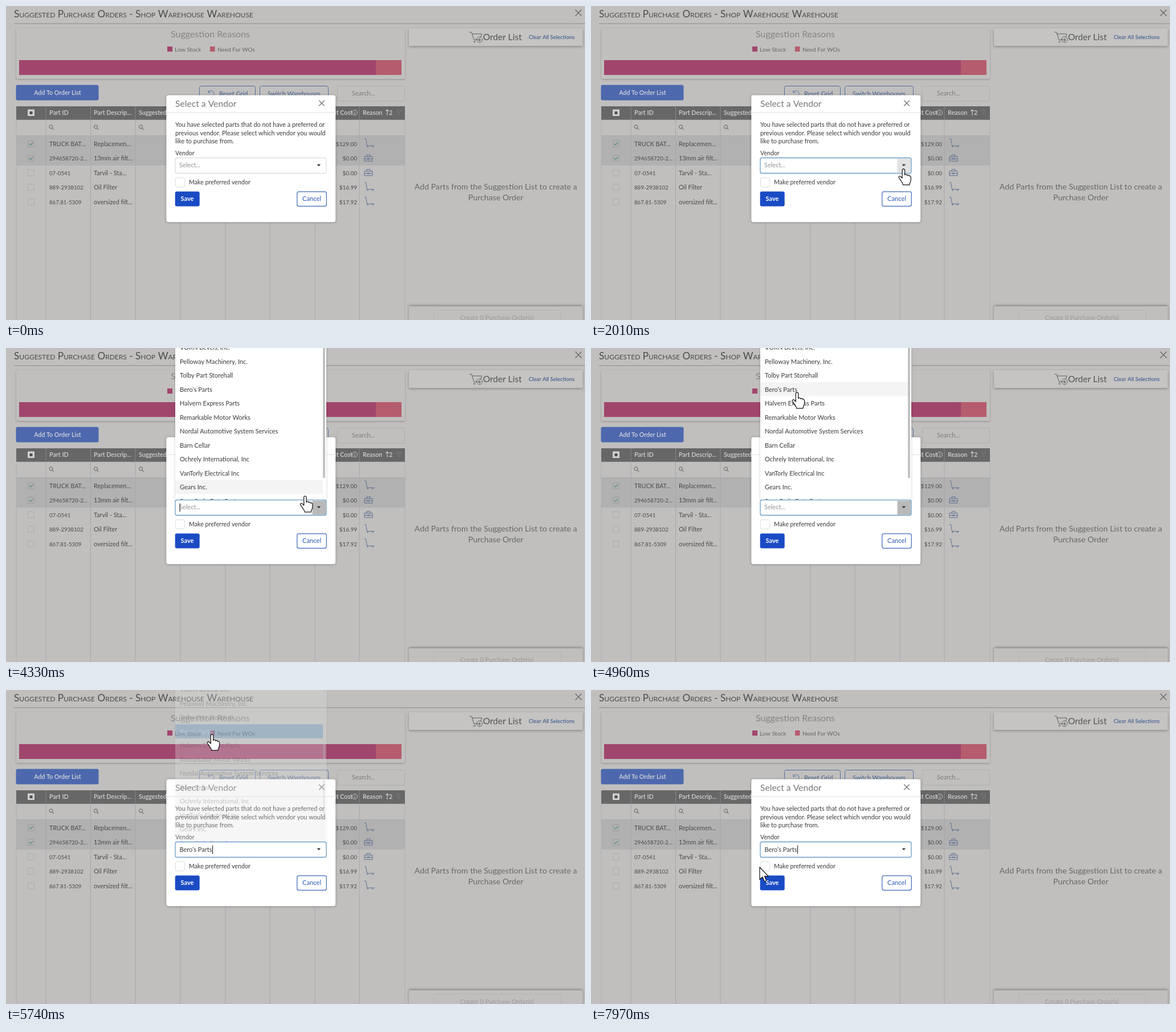
Recreate the animation shown at these times as an HTML page with a canvas. Size 1016 by 551 pixels, loop 8 s.

```html
<!DOCTYPE html>
<html lang="en">
<head>
<meta charset="utf-8">
<title>Select a Vendor</title>
<style>
html, body { margin: 0; width: 100%; height: 100%; overflow: hidden; background: #c0bfbe; }
canvas { display: block; width: 1016px; height: 551px; }
</style>
</head>
<body>
<canvas id="stage"></canvas>
<script>
const W = 1016, H = 551, LOOP = 8000;
const canvas = document.getElementById('stage');
const ctx = canvas.getContext('2d');
const dpr = window.devicePixelRatio || 1;
canvas.width = W * dpr;
canvas.height = H * dpr;

const BG = '#c0bfbe', INK = '#4a4a4a', LINE = '#a7a6a6', NAVY = '#46608e', ICON = '#54678b';
const COLS = [70, 148.5, 227, 306, 385, 463, 542, 620];
const PICK = 3;
const VENDORS = [
  'VORN Bevels, Inc.', 'Pelloway Machinery, Inc.', 'Tolby Part Storehall', 'Bero\u2019s Parts',
  'Halvern Express Parts', 'Remarkable Motor Works', 'Nordal Automotive System Services',
  'Barn Cellar', 'Ochrely International, Inc', 'VanTorly Electrical Inc', 'Gears Inc.',
  'Sure Code Data Port'
];
const ROWS = [
  ['TRUCK BAT...', 'Replacemen...', '$129.00', cart],
  ['294658720-2...', '13mm air filt...', '$0.00', toolbox],
  ['07-0541', 'Tarvil - Sta...', '$0.00', toolbox],
  ['889-2938102', 'Oil Filter', '$16.99', cart],
  ['867.81-5309', 'oversized filt...', '$17.92', cart]
];

const ARROW = new Path2D('M0 0V21.5L4.9 17 8.3 25 11.8 23.5 8.5 15.8H15.3Z');
const HAND = new Path2D('M-2.4 1.8C-2.4 -1.4 2 -1.4 2 1.8V10C3 8.4 6 8.6 6.2 10.8' +
  'C7.2 9.4 9.7 9.8 9.9 12C10.8 11 12.8 11.6 12.8 13.6V19C12.8 22 10.3 23.6 10.3 27.4H-1' +
  'C-1 24 -3.6 22.2 -5.2 19.4L-8.2 15C-9.4 12.8 -6.8 11 -4.9 13L-2.4 15.6Z');
const BEAM = new Path2D('M-3 -8Q0 -8 0 -6Q0 -8 3 -8M0 -6V6M-3 8Q0 8 0 6Q0 8 3 8');

function text(s, x, y, size, color, align = 'left', weight = 400, caps = '') {
  ctx.font = `${caps} ${weight} ${size}px Lato, "Open Sans", sans-serif`;
  ctx.textAlign = align;
  ctx.fillStyle = color;
  ctx.fillText(s, x, y);
}

function rect(x, y, w, h, color) {
  ctx.fillStyle = color;
  ctx.fillRect(x, y, w, h);
}

function box(x, y, w, h, r, fill, stroke, lw = 1) {
  ctx.beginPath();
  ctx.roundRect(x, y, w, h, r);
  if (fill) { ctx.fillStyle = fill; ctx.fill(); }
  if (stroke) { ctx.strokeStyle = stroke; ctx.lineWidth = lw; ctx.stroke(); }
}

function shadowBox(x, y, w, h, r, fill, blur, dy, alpha) {
  ctx.save();
  ctx.shadowColor = `rgba(0,0,0,${alpha})`;
  ctx.shadowBlur = blur * dpr;
  ctx.shadowOffsetY = dy * dpr;
  box(x, y, w, h, r, fill);
  ctx.restore();
}

function stroke(d, x, y, color, lw = 1) {
  ctx.save();
  ctx.translate(x, y);
  ctx.strokeStyle = color;
  ctx.lineWidth = lw;
  ctx.stroke(new Path2D(d));
  ctx.restore();
}

function cross(x, y, r, color, lw) {
  stroke(`M${-r} ${-r}L${r} ${r}M${r} ${-r}L${-r} ${r}`, x, y, color, lw);
}

function cart(y) {
  stroke('M0 -8.5H2.5L4.5 3.5H17M5.5 5.8a.8 .8 0 1 1 .1 0M14.5 5.8a.8 .8 0 1 1 .1 0', 629, y, ICON, 0.9);
}

function toolbox(y) {
  stroke('M0 -3H14V5H0ZM4 -3V-6H10V-3M0 1H5.5M8.5 1H14M5.5 0h3v2h-3Z', 629, y, ICON, 0.9);
}

function drawReasons() {
  shadowBox(18, 39, 682, 89, 2, BG, 3, 1, 0.26);
  text('Suggestion Reasons', 358.5, 55, 16, '#858483', 'center');
  rect(283, 71, 9, 9, '#a0466d');
  text('Low Stock', 296, 80, 10.3, '#656565');
  rect(358, 71, 8.5, 9, '#b55c6e');
  text('Need For WOs', 371, 80, 10, '#656565');
  rect(23, 95, 626, 26, '#a0466d');
  rect(649, 95, 45, 26, '#b55c6e');
}

function drawToolbar() {
  box(17.5, 138.5, 145, 27, 3, '#4d68ad');
  text('Add To Order List', 90.5, 156, 10.6, '#d5d6dc', 'center', 600);
  box(339.5, 140.5, 98, 26, 3, null, '#566f9f');
  stroke('M-5 -5V-1H-1M-4.6 -1.4A5 5 0 1 1 -3.6 4', 360, 153, '#566f9f');
  text('Reset Grid', 374, 158, 11, NAVY);
  box(445.5, 140.5, 120, 26, 3, null, '#566f9f');
  text('Switch Warehouses', 505.5, 158, 10.8, NAVY, 'center');
  box(581.5, 140.5, 118, 26.5, 3, null, '#aeadac');
  text('Search...', 607, 157, 11, '#7c7c7c');
}

function drawGrid() {
  rect(18, 227, 682, 53, '#b2b1b1');
  rect(18, 227, 682, 1, '#aaa');
  for (const x of COLS) rect(x - 0.5, 200, 1, 351, LINE);
  rect(17.5, 200, 1, 351, '#b0b0b0');
  rect(699.5, 200, 1, 351, '#b0b0b0');

  rect(18, 176, 682, 23.7, '#676767');
  for (const x of COLS) rect(x - 0.5, 176, 1, 23.7, '#888');
  const head = '#d2d2d2';
  box(38, 181.5, 12, 11.5, 1, '#d0d0d0');
  rect(41.5, 185, 5, 5, '#505050');
  text('Part ID', 76, 191, 10.8, head, 'left', 600);
  text('Part Descrip...', 154, 191, 10.7, head, 'left', 600);
  text('Suggested', 233, 191, 10.7, head, 'left', 600);
  text('Unit Cost', 608, 191, 10.7, head, 'right', 600);
  stroke('M0 -4.5A4.5 4.5 0 1 1 -.1 -4.5M0 -1V3M0 -3V-2', 612, 187, head, 0.9);
  text('Reason', 626, 191, 10.7, head, 'left', 600);
  stroke('M0 5V-5M-2.5 -2.5L0 -5L2.5 -2.5', 669, 187, head, 1.1);
  text('2', 672, 191, 10.7, head, 'left', 600);
  stroke('M-4 -4H4L1 0V4L-1 3V0Z', 689, 187, '#7a7a7a');

  for (const x of [80, 158.5, 237.5])
    stroke('M2 -1A3 3 0 1 1 2 -1.1M1 1.2L4 4.2', x, 213, '#6a6a6a', 1.1);

  ROWS.forEach(([id, name, cost, icon], i) => {
    const y = 241.7 + i * 25.5, num = /^\d/.test(id);
    box(38.5, y - 5.5, 10.5, 11, 1, null, i < 2 ? '#9b9b9b' : '#acacac');
    if (i < 2) stroke('M-3 0L-1 2.2L3.2 -2.4', 44, y, '#4a858a', 1.1);
    text(id, 76, y + 4, num ? 9.7 : 10.6, INK);
    text(name, 154, y + 4, 10.8, INK);
    text(cost, 616, y + 4, 10, INK, 'right');
    icon(y);
  });
}

function drawOrders() {
  shadowBox(707, 39, 305, 31, 1, '#c5c4c3', 4, 1.5, 0.3);
  stroke('M0 0H4L8 13H20M4.6 3H22L20 9M9 18a1.4 1.4 0 1 1 .1 0', 813, 46, '#606060', 1);
  stroke('M0 -5A5 5 0 1 1 -.1 -5M0 -2.5V2.5M-2 .5L0 2.5L2 .5', 831, 59, '#606060', 1);
  text('Order List', 837, 60, 15.5, '#555');
  text('Clear All Selections', 998, 58, 9.5, NAVY, 'right', 600);
  text('Add Parts from the Suggestion List to create a', 859.5, 322, 14.2, '#686868', 'center');
  text('Purchase Order', 859.5, 341, 14.2, '#686868', 'center');
  shadowBox(707, 527, 305, 30, 1, BG, 4, -1.5, 0.32);
  box(750.5, 533.5, 223, 26, 3, null, '#b6b5b4');
  text('Create 0 Purchase Order(s)', 861.5, 551, 11, '#9b9a99', 'center');
}

function drawPage() {
  rect(0, 0, W, H, BG);
  text('Suggested Purchase Orders - Shop Warehouse Warehouse', 14, 20, 17.2, '#4c4c4c', 'left', 400, 'small-caps');
  rect(14, 30.5, W - 14, 1, '#8a8a8a');
  cross(1004.5, 12, 5.5, '#6c6c6c', 1.4);
  drawReasons();
  drawToolbar();
  drawGrid();
  drawOrders();
}

function drawModal(s) {
  shadowBox(281.3, 156.5, 297, 222.7, 4, '#fff', 4, 0.5, 0.32);
  text('Select a Vendor', 297, 177, 15.7, '#777');
  cross(554, 170.5, 4.8, '#777', 1.3);
  rect(282, 186.5, 296, 1, '#ddd');
  ['You have selected parts that do not have a preferred or',
   'previous vendor. Please select which vendor you would',
   'like to purchase from.'].forEach((l, i) => text(l, 297, 212 + i * 14.5, 10.9, '#3a3a3a'));
  text('Vendor', 297, 262, 10.6, '#3a3a3a');

  box(297, 266.5, 265, 27, 3, '#fff', s.focus ? '#6a9cc6' : s.hover ? '#adcae2' : '#d2d2d2', s.focus ? 1.3 : 1);
  if (s.hover || s.open) rect(537.5, 268, 23.5, 24.5, s.hover ? '#e2e2e2' : '#b9b9b9');
  ctx.fillStyle = '#333';
  ctx.fill(new Path2D('M545.6 277.8H552.2L548.9 281.2Z'));
  if (s.chosen) text(VENDORS[PICK], 304.5, 283.5, 11, '#3a3a3a');
  else text('Select...', 304, 283, 11, '#929292');
  if (s.caret) rect(s.chosen ? 362 : 304.5, 272.5, 1.1, 15, '#222');

  box(297.5, 301.5, 16, 16, 2, '#fff', '#dcdcdc');
  text('Make preferred vendor', 321, 312.5, 10.7, '#3a3a3a');
  box(296.7, 325.5, 43, 26, 3, '#194bc4');
  text('Save', 318, 342, 11, '#fff', 'center', 700);
  box(510.8, 325.8, 51.5, 25.5, 3, '#fff', '#3d69ba', 1.2);
  text('Cancel', 536.5, 342, 11.2, '#2a56b4', 'center');
}

function drawList(s) {
  ctx.save();
  ctx.globalAlpha = s.listAlpha;
  ctx.beginPath();
  ctx.rect(284, 0, 290, 266);
  ctx.clip();
  shadowBox(297, -10, 265, 276, 0, '#fff', 4, 0, 0.2);
  VENDORS.forEach((name, i) => {
    const y = -1 + i * 24.5, on = i === s.row;
    if (on) rect(297, y - 12.3, 259, 24.5, s.pressed ? '#337ab7' : '#f4f4f4');
    text(name, 305, y + 4, 11, on && s.pressed ? '#fff' : '#3a3a3a');
  });
  if (s.scroll) rect(556, 0, 4, 228, '#c2c2c2');
  ctx.restore();
}

function drawCursor(s) {
  ctx.save();
  ctx.translate(s.x, s.y);
  ctx.lineJoin = 'round';
  ctx.strokeStyle = '#111';
  ctx.lineWidth = 1.2;
  ctx.fillStyle = '#fff';
  const shape = { arrow: ARROW, hand: HAND, beam: BEAM }[s.cursor];
  if (shape !== BEAM) ctx.fill(shape);
  ctx.stroke(shape);
  ctx.restore();
}

// Each move: start, end, steps, then the point reached.
const MOVES = [
  [520, 1280, 12, 549, 289],
  [1350, 1350, 1, 548.5, 286.5],
  [4180, 4810, 9, 363, 80],
  [4960, 4960, 1, 361.7, 78.5],
  [6120, 6660, 8, 363, 138],
  [6820, 7420, 9, 323, 300],
  [7570, 7810, 4, 288, 314],
  [7890, 7970, 2, 296, 311]
];

function pointer(t) {
  let x = 944, y = 521;
  for (const [a, b, n, tx, ty] of MOVES) {
    if (t < a) break;
    const k = t >= b ? n : Math.floor((t - a) / (b - a) * (n - 1)) + 1;
    const p = k / n, e = p * p * (3 - 2 * p);
    x += (tx - x) * e;
    y += (ty - y) * e;
  }
  return { x, y };
}

// The caret blinks every 530 ms and restarts when a vendor is chosen.
function caretOn(t) {
  const from = t < 5590 ? 2060 : 5590;
  return t >= 2080 && Math.floor((t - from) / 530) % 2 === 0;
}

function stateAt(t) {
  const s = pointer(t);
  s.open = t >= 2080 && t < 5560;
  s.focus = t >= 1950;
  s.chosen = t >= 5590;
  s.pressed = t >= 5430;
  s.caret = caretOn(t);
  const fade = Math.min(1, Math.max(0, (t - 5560) / 370));
  s.listAlpha = t < 2080 ? 0 : (1 - fade) ** 2;
  s.hover = t >= 520 && s.x > 297 && s.x < 562 && s.y >= 266 && s.y < 294;
  s.scroll = s.listAlpha > 0 && s.y < 266;
  s.row = s.scroll ? Math.round((s.y - 5.5) / 24.5) : -1;
  s.cursor = t >= 1350 && t < 6120 ? 'hand' : s.hover && s.x < 538 ? 'beam' : 'arrow';
  return s;
}

function draw(now) {
  const t = now % LOOP, s = stateAt(t);
  ctx.setTransform(dpr, 0, 0, dpr, 0, 0);
  drawPage();
  drawModal(s);
  if (s.listAlpha > 0) drawList(s);
  if (t >= 520) drawCursor(s);
}

const start = performance.now();
function tick() {
  draw(performance.now() - start);
  requestAnimationFrame(tick);
}
tick();
</script>
</body>
</html>
```
